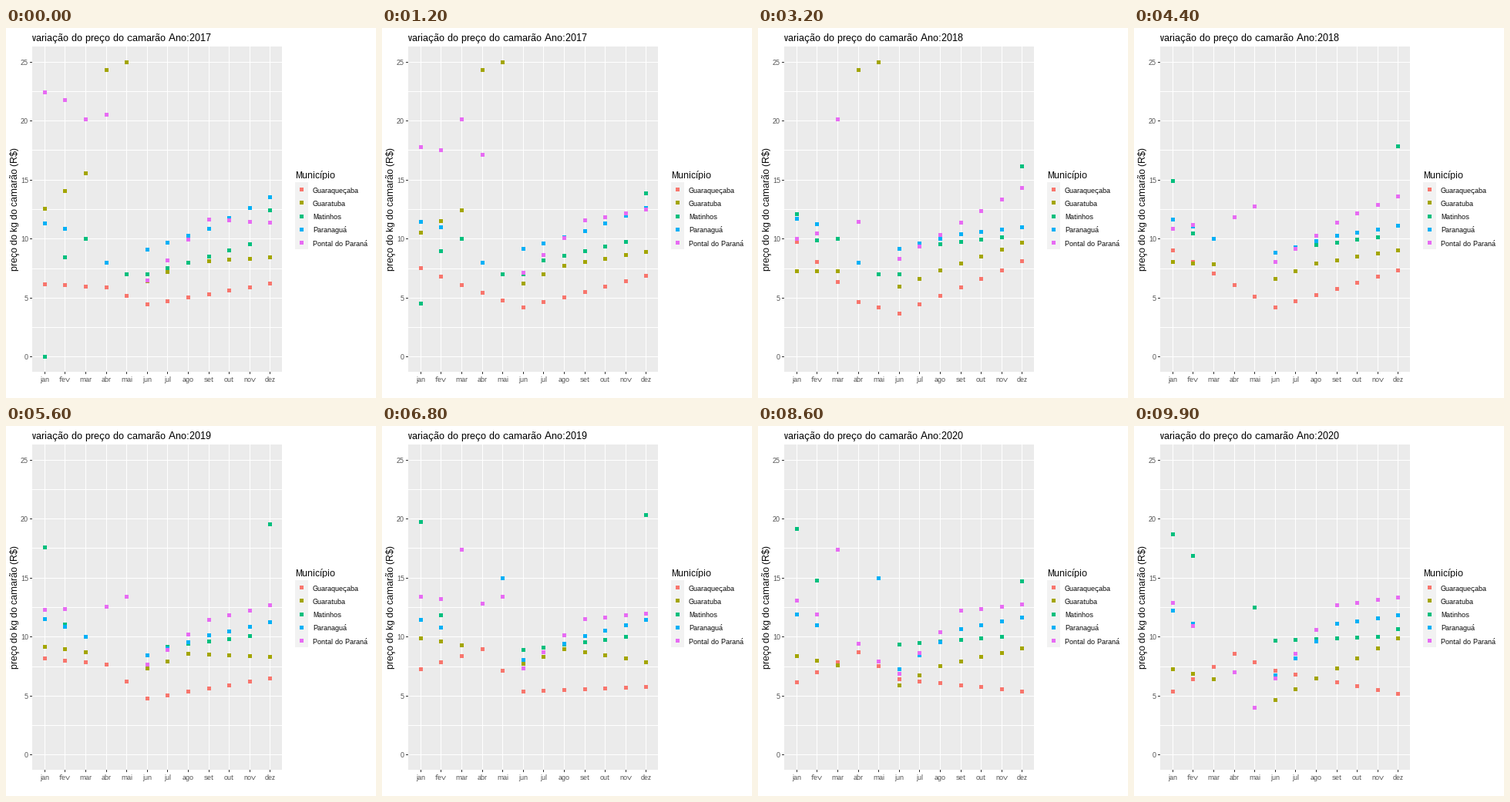
Recreate the animation shown at these times as a matplotlib script. Size 480 by 480 pixels, loop 10000 ms.

```python
import numpy as np
import matplotlib.pyplot as plt
from matplotlib.animation import FuncAnimation
from matplotlib.patches import Rectangle

plt.rcParams.update({
    "font.family": "Liberation Sans",
    "text.hinting": "native",
    "text.hinting_factor": 1,
})

SIZE, FRAMES, STEP = 480, 100, 33
MONTHS = "jan fev mar abr mai jun jul ago set out nov dez".split()
X0, DX = 50.4, 26.58
Y0, DY = 426.8, 15.304

fig = plt.figure(figsize=(SIZE / 72, SIZE / 72), dpi=72, facecolor="white")
ax = fig.add_axes([0, 0, 1, 1])
ax.set(xlim=(0, SIZE), ylim=(SIZE, 0))
ax.axis("off")


def box(x, y, w, h, color):
    ax.add_patch(Rectangle((x, y), w, h, fc=color, lw=0, aa=False, zorder=1))


def label(x, y, s, size, color="black", **kw):
    kw.setdefault("va", "baseline")
    return ax.text(x, y, s, size=size, color=color, **kw)


def dots(x, y, colors):
    return ax.scatter(x, y, s=25, c=colors, lw=0, antialiased=False, zorder=3)


def px(v):
    """Centre of the pixel that holds v."""
    return np.floor(v) + 0.5


def months(names):
    return [MONTHS.index(m) for m in names.split()]


def prices(keys, years, gap="", lone={}):
    """Monthly prices for each year, drawn through a few key months.

    Months in gap have no price, except the lone ones (year, month).
    """
    p = np.array([np.interp(range(12), months(keys), y) for y in years])
    p[:, months(gap)] = np.nan
    for (year, m), v in lone.items():
        p[year - 2017, MONTHS.index(m)] = v
    return p


TOWNS = {
    "Guaraqueçaba": ("#F8766D", prices(
        "jan abr jun dez",
        [(6.15, 5.9, 4.45, 6.2), (9.9, 4.6, 3.68, 8.15),
         (7.4, 9, 5.25, 5.8), (5.4, 8.55, 7.15, 5.15)])),
    "Guaratuba": ("#A3A500", prices(
        "jan mar jun ago dez",
        [(12.55, 15.55, 6.4, 8, 8.45), (7.1, 7, 5.95, 7.3, 9.7),
         (10.05, 9.5, 7.9, 9.15, 7.75), (7.3, 6.4, 4.65, 6.5, 9.9)],
        "abr mai", {(2017, "abr"): 24.35, (2017, "mai"): 25})),
    "Matinhos": ("#00BF7D", prices(
        "jan fev jun nov dez",
        [(0, 8.45, 7, 9.55, 12.45), (12.5, 9.95, 9.2, 10.2, 16.3),
         (19.8, 11.5, 8.85, 10, 20.95), (18.7, 16.9, 9.7, 10, 10.7)],
        "mar abr mai", {(2017, "mar"): 10, (2017, "mai"): 7,
                        (2018, "jun"): np.nan, (2020, "mai"): 12.5})),
    "Paranaguá": ("#00B0F6", prices(
        "jan jun set dez",
        [(11.3, 9.1, 10.85, 13.55), (11.75, 9.2, 10.4, 10.95),
         (11.4, 8.15, 10, 11.4), (12.25, 6.75, 11.1, 11.85)],
        "mar abr mai", {(2017, "abr"): 8, (2018, "mar"): 10,
                        (2019, "mai"): 15})),
    "Pontal do Paraná": ("#E76BF3", prices(
        "jan abr jun set dez",
        [(22.43, 20.55, 6.5, 11.65, 11.4), (9.6, 11.15, 8.35, 11.4, 14.45),
         (13.45, 13.2, 7.4, 11.45, 11.9), (12.9, 7, 6.5, 12.7, 13.35)],
        "mar mai", {(2017, "mar"): 20.15, (2018, "mai"): 12.1,
                    (2019, "mar"): 17.4, (2019, "mai"): 14,
                    (2020, "mai"): 4})),
}
COLORS = [color for color, _ in TOWNS.values()]
DATA = np.hstack([p for _, p in TOWNS.values()])

# panel, grid and axes
xs = px(X0 + DX * np.arange(12))
box(34, 24, 324, 422, "#EBEBEB")
for v in np.arange(0, 25.1, 2.5):
    y = int(Y0 - DY * v)
    box(34, y, 324, 1, "white")
    if v % 5 == 0:
        box(31, y, 3, 1, "#333333")
        label(29, y + 4, f"{v:.0f}", 9, "#4D4D4D", ha="right")
for x, m in zip(xs, MONTHS):
    box(x - 0.5, 24, 1, 422, "white")
    box(x - 0.5, 446, 1, 3, "#333333")
    label(x, 459, m, 9, "#4D4D4D", ha="center")

title = label(33.5, 17, "", 13.2)
label(11.5, 235, "preço do kg do camarão (R$)", 12, rotation=90,
      ha="center", va="center")

# legend
label(375, 195, "Município", 11.6)
rows = 209.5 + 17.28 * np.arange(len(TOWNS))
for y, name in zip(rows, TOWNS):
    box(375, y - 9.3, 17, 17.28, "#F2F2F2")
    label(398, round(y + 4), name, 9)
dots(np.full(len(rows), 383.5), px(rows), COLORS)

cols = np.tile(xs, len(TOWNS))
points = dots(cols, cols, np.repeat(COLORS, 12))


def update(i):
    k, r = divmod(i, STEP)
    a, b = DATA[k], DATA[min(k + 1, 3)]
    # a price missing next year holds still until that year begins
    b = np.where(np.isnan(b), a, b)
    y = px(Y0 - DY * (a + (b - a) * r / STEP))
    points.set_offsets(np.column_stack([cols, y]))
    title.set_text(f"variação do preço do camarão Ano:{round(2017 + i / STEP)}")


anim = FuncAnimation(fig, update, frames=FRAMES, interval=100, repeat=True,
                     repeat_delay=0, cache_frame_data=False)
plt.show()
```
